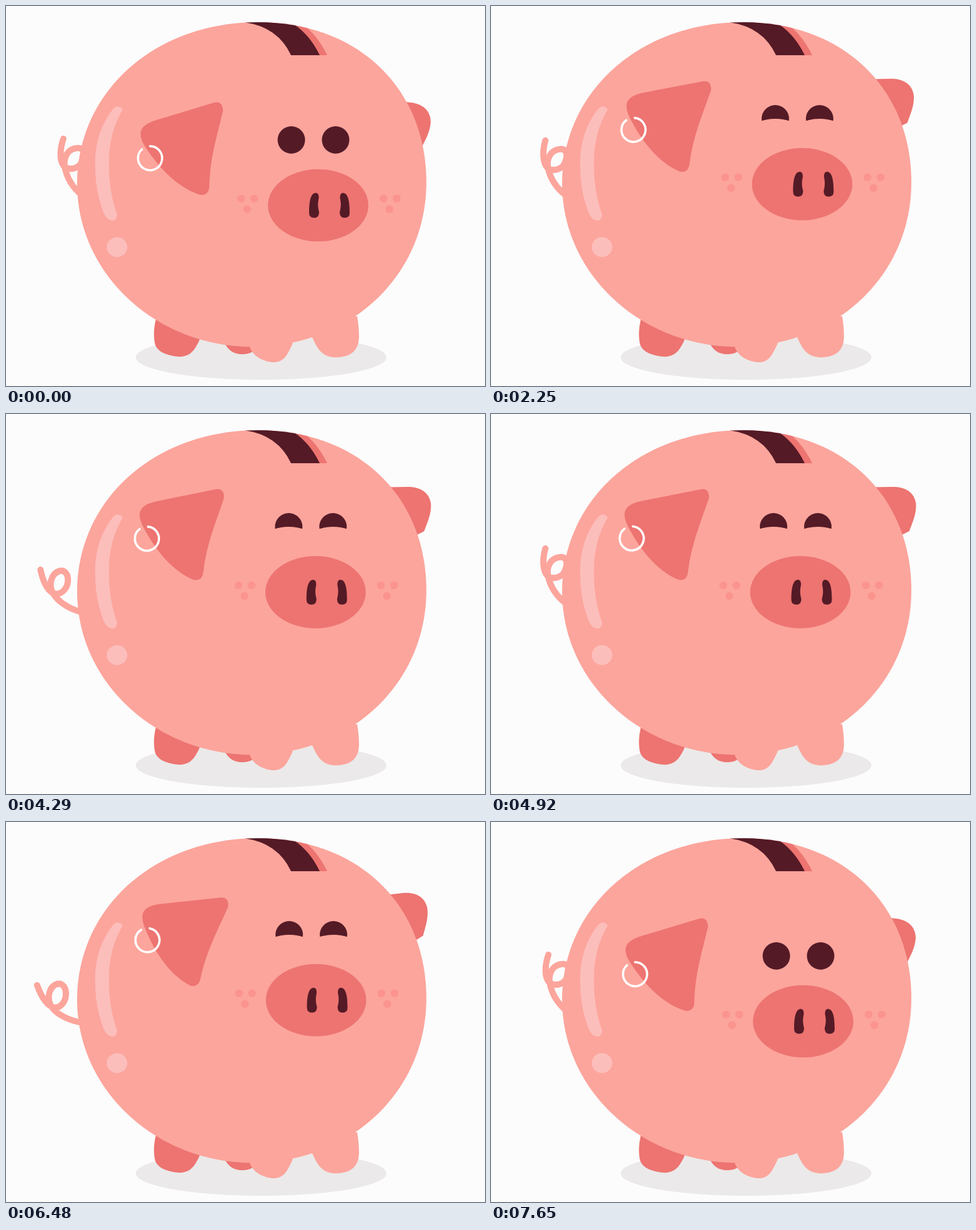
An HTML page that plays this animation: 768x610 px, repeating every 8100 ms.

```html
<!DOCTYPE html>
<html lang="en">
<head>
<meta charset="utf-8">
<title>Piggy bank</title>
<style>
  html, body { margin: 0; width: 100%; height: 100%; overflow: hidden; background: #fcfcfc; }
  svg { display: block; width: 768px; height: 610px; }
  .skin { fill: #fca59c; }
  .rose { fill: #ed7471; }
  .dark { fill: #541a26; }
  .shine { fill: #fcbebb; }
  .freckle { fill: #fb948e; }
  .line { fill: none; stroke-linecap: round; }
</style>
</head>
<body>
<svg viewBox="0 0 768 610">
  <defs>
    <path id="body" d="M114 285C114 140 235 26 405 26C564 26 674 132 674 283C674 432 553 547 395 547C240 547 114 430 114 285Z"/>
    <clipPath id="inBody"><use href="#body"/></clipPath>
    <path id="nostril" d="M486 332C486 315 488 300 497 300Q503 301 501 311Q499 320 502 331Q502 340 494 340Q486 340 486 332Z"/>
    <g id="freckles">
      <circle cx="377" cy="309" r="6.3"/><circle cx="398" cy="309" r="6.3"/><circle cx="386.5" cy="326" r="6.3"/>
    </g>
  </defs>

  <ellipse cx="409" cy="564" rx="201" ry="36" fill="#ebe9e9"/>
  <path id="tail" class="line" stroke="#fca59c" stroke-width="10"/>
  <path id="farEar" class="rose" d="M600 151L645 154.500C668 156 681 168 681 186C680 201 674 212 666 228L610 250Z"/>
  <path class="rose" d="M241 500C237 515 236 530 239 543C243 556 260 562 279 563C298 562 304 550 313 530Z
    M350 540C356 553 366 559 378 559Q389 559 395 555V540Z"/>
  <use href="#body" class="skin"/>
  <path class="skin" d="M389 540C391 558 408 571 430 572C448 571 452 557 460 541L430 520Z
    M491 532C499 548 504 564 531 564C556 563 566 550 566 530Q566 515 563 498L520 500Z"/>

  <g clip-path="url(#inBody)">
    <path class="rose" d="M455 20L484 36Q503 54 515 79H490Z"/>
    <path class="dark" d="M384 26.500V20H455L464 31Q488 48 503 79H457Q436 34 384 26.500Z"/>
  </g>
  <path class="shine" d="M172 165Q180 157 187 166C173 190 165 218 165 252C165 285 170 312 178 334Q178 346 168 344Q160 341 157 333C146 305 143 280 143 252C143 220 152 190 172 165Z"/>
  <ellipse class="shine" cx="178" cy="387" rx="16.500" ry="16"/>

  <g id="head">
    <g id="ear">
      <path class="rose" d="M334 155Q347 152 348 168C338 210 327 245 326 288Q326 305 311 303C270 290 240 252 222 224C208 200 218 189 248 181Z"/>
      <path class="line" stroke="#fff" stroke-width="3.600" stroke-linecap="butt" d="M231 225A19.300 19.300 0 1 1 218 230"/>
    </g>
    <circle class="dark" cx="457.500" cy="215" r="22"/>
    <circle class="dark" cx="528.500" cy="215" r="22"/>
    <path id="lids" class="skin"/>
    <ellipse class="rose" cx="500.500" cy="320" rx="80.500" ry="58"/>
    <use href="#nostril" class="dark"/>
    <use href="#nostril" class="dark" transform="translate(1037) scale(-1 1)"/>
    <use href="#freckles" class="freckle"/>
    <use href="#freckles" class="freckle" x="228.300"/>
  </g>
</svg>
<script>
const LOOP = 8100, STEP = 30;
const $ = id => document.getElementById(id);
const clamp = u => Math.min(1, Math.max(0, u));
const mix = (a, b, u) => a + (b - a) * u;
const ramp = (t, from, to) => { const u = clamp((t - from) / (to - from)); return u * u * (3 - 2 * u); };
const swell = u => (1 - Math.cos(2 * Math.PI * u)) / 2;

// Tail curves, curled up and swung out: start point, then cubic control points.
const CURLED = [[92,213], [87,228], [84,250], [95,259], [105,264], [118,260], [122,249], [128,236],
  [124,227], [114,228], [101,229], [92,240], [94,257], [97,275], [105,290], [122,304]];
const SWUNG = [[48,268], [55,284], [64,299], [76,302], [88,304], [96,291], [95,278], [94,266],
  [86,261], [78,265], [68,270], [65,286], [70,297], [76,310], [98,322], [124,324]];
const HINGE = [135, 292];

const polar = ([x, y]) => {
  const dx = x - HINGE[0], dy = y - HINGE[1];
  return [Math.hypot(dx, dy), (Math.atan2(dy, dx) + 2 * Math.PI) % (2 * Math.PI)];
};
const curled = CURLED.map(polar), swung = SWUNG.map(polar);

function tailPath(u) {
  const pts = curled.map(([r, a], i) => {
    const rad = mix(r, swung[i][0], u), ang = mix(a, swung[i][1], u);
    return (HINGE[0] + rad * Math.cos(ang)).toFixed(2) + ' ' + (HINGE[1] + rad * Math.sin(ang)).toFixed(2);
  });
  return 'M' + pts[0] + 'C' + pts.slice(1).join(' ');
}

// One quick wag to start, then an even beat.
function wag(t) {
  if (t < 960 || t > 7550) return 0;
  return swell(t < 1320 ? (t - 960) / 360 : (t - 1320) / 445);
}

const lid = (x, y) => `M${x - 24} ${y + 4}Q${x} ${y - 4} ${x + 24} ${y + 4}V240H${x - 24}Z`;

function draw(t) {
  const back = 1 - ramp(t, 6640, 7360);
  const dy = -34 * ramp(t, 960, 1500) * back;
  const dx = -4.5 * Math.sin(Math.PI / 2 * clamp((t - 1350) / 3850)) * (1 - ramp(t, 6000, 7500));
  const tilt = (7.9 + 2.9 * Math.cos(2 * Math.PI * (t - 6480) / 289)) * ramp(t, 960, 1340) * back;
  const shut = ramp(t, 1020, 1580) * back;

  $('head').setAttribute('transform', `translate(${dx} ${dy})`);
  $('ear').setAttribute('transform', `rotate(${tilt} 340 230)`);
  $('farEar').setAttribute('transform', `translate(${-1.1 * dx} ${dy}) rotate(${-tilt} 605 228)`);
  const y = mix(241, 215, shut);
  $('lids').setAttribute('d', shut > 0 ? lid(457.5, Math.min(y, 235.9)) + lid(528.5, Math.min(y, 235.9)) : '');
  $('tail').setAttribute('d', tailPath(wag(t)));
}

function tick() {
  const t = performance.now() % LOOP;
  draw(Math.floor(t / STEP) * STEP);
  requestAnimationFrame(tick);
}
tick();
</script>
</body>
</html>
```
